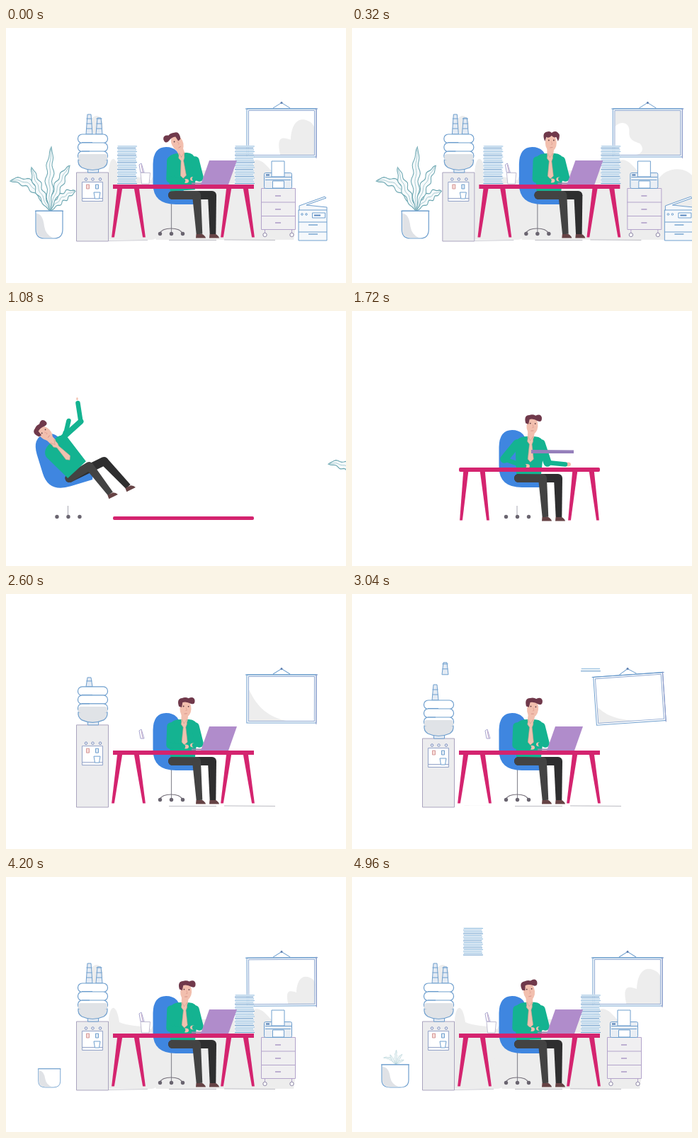
These frames come from a looping animation (480x360 px, 5000 ms). An HTML page with a canvas:

```html
<!DOCTYPE html>
<html>
<head>
<meta charset="utf-8">
<style>
html, body { margin: 0; width: 100%; height: 100%; overflow: hidden; background: #fff }
canvas { display: block }
</style>
</head>
<body>
<canvas id="stage" width="480" height="360"></canvas>
<script>
const c = document.getElementById('stage').getContext('2d');
const BLUE = '#6f9fce', LILAC = '#b3a3cb', GREY = '#ededed', PINK = '#d4246f', GREEN = '#14b391', SKIN = '#f2bfae';
const DONE = 1e5, LOOP = 5000, TAU = Math.PI * 2;

const seg = (t, a, b) => Math.min(1, Math.max(0, (t - a) / (b - a)));
const lerp = (a, b, p) => a + (b - a) * p;
const mix = (p, q, a) => p.map((v, i) => lerp(v, q[i], a));
const smooth = p => p * p * (3 - 2 * p);
const out = p => 1 - (1 - p) ** 3;
function keys(t, ...ks) {
  if (t <= ks[0][0]) return ks[0][1];
  for (let i = 1; i < ks.length; i++)
    if (t <= ks[i][0]) return lerp(ks[i - 1][1], ks[i][1], smooth(seg(t, ks[i - 1][0], ks[i][0])));
  return ks[ks.length - 1][1];
}

function paint(path, fill, stroke, width = 1) {
  if (fill) { c.fillStyle = fill; c.fill(path); }
  if (stroke) { c.strokeStyle = stroke; c.lineWidth = width; c.stroke(path); }
}
const shape = (d, ...style) => paint(new Path2D(d), ...style);
const poly = (pts, ...style) => shape('M' + pts.map(p => p.join(' ')).join('L') + 'Z', ...style);
const line = (pts, stroke, width) => shape('M' + pts.map(p => p.join(' ')).join('L'), null, stroke, width);
function box(x, y, w, h, fill, stroke, r = 0, width = 1) {
  const p = new Path2D();
  p.roundRect(x, y, w, h, r);
  paint(p, fill, stroke, width);
}
function oval(x, y, rx, ry, fill, stroke) {
  const p = new Path2D();
  p.ellipse(x, y, rx, ry, 0, 0, TAU);
  paint(p, fill, stroke);
}
function about(x, y, angle, sx, sy, draw) {
  c.save();
  c.translate(x, y); c.rotate(angle); c.scale(sx, sy); c.translate(-x, -y);
  draw();
  c.restore();
}
function shifted(x, y, draw) {
  c.save(); c.translate(x, y); draw(); c.restore();
}

function backdrop(t, spread) {
  const g = smooth(seg(t, 3000, 4200));
  if (g) {
    about(172, 299, 0, .5 + .5 * g, g, () =>
      shape('M145 299V200C148 176 157 182 160 205C185 215 205 205 212 225C222 260 222 300 205 299Z', GREY));
    about(322, 299, 0, .3 + .7 * g, g, () =>
      shape('M212 299C198 270 196 215 212 205C240 190 330 215 345 190C362 176 372 205 390 215C412 225 412 270 406 299Z', GREY));
  }
  if (spread) about(430, 299, 0, spread, spread, () =>
    shape('M403 299V215C416 193 448 195 456 215V299Z', GREY));
  if (t > 2300) {
    line([[230, 299.5], [297, 299.5]], '#bdbdc4');
    line([[308, 299], [380, 299.5]], '#bdbdc4');
  }
  if (t > 3900) line([[145, 300.5], [200, 299.5]], '#c8c8d0');
}

function boardShade(t, spread) {
  if (t < 3300) about(343, 180, 0, 1, 1 - seg(t, 2800, 3300), () =>
    shape('M343 135C355 160 370 174 400 180H343Z', GREY));
  const g = out(seg(t, 4000, 4500));
  if (g) about(438, 182, 0, g * (1 + spread), g * (1 + 2 * spread), () =>
    shape('M388 182C380 150 392 155 402 158C404 122 424 128 432 135C438 142 438 150 438 182Z', GREY));
  if (spread > .3) {
    c.globalAlpha = seg(spread, .3, 1);
    box(343, 117, 93, 63, GREY);
    c.globalAlpha = 1;
    shape('M343 139C352 130 364 134 363 146C362 158 370 160 378 163C386 172 380 179 368 180H343Z', '#fff');
  }
}

function board(t, spread) {
  const u = t - 2000;
  if (u < 0) return;
  const swing = 40 * Math.exp(-u / 450) * Math.sin(u / 600 * TAU) * Math.PI / 180;
  const size = out(seg(u, 0, 160));
  about(389, 105, swing, size, size, () => {
    box(340, 114, 98, 68, '#fff', BLUE);
    c.save();
    c.beginPath(); c.rect(343, 117, 93, 63); c.clip();
    boardShade(t, spread);
    c.restore();
    box(342.5, 116.5, 93, 63, null, '#8fa9d2');
    line([[338, 114], [440, 114]], '#5f93c8');
    line([[438, 113], [438, 184]], '#8f98c8');
    line([[377, 113], [389, 105.5], [401, 113]], BLUE);
    oval(389, 105.5, 1.5, 1.5, '#5f7fb0');
  });
}

function cup(x, bottom, height) {
  poly([[x - 4.5, bottom], [x - 2.5, bottom - height], [x + 2.5, bottom - height], [x + 4.5, bottom]], '#e4ebf4', BLUE);
  for (let y = 8; y < height; y += 7) line([[x - 4, bottom - y], [x + 4, bottom - y]], BLUE);
}

function bottle() {
  box(115.5, 196, 15, 8, '#e8edf4', BLUE);
  shape('M102 186H143Q144 193 138 197Q122 204 107 197Q101 193 102 186Z', '#e0e3e7', BLUE, 1.2);
  for (const y of [150, 162, 174]) box(101.5, y, 42, 12.5, '#fff', BLUE, 6, 1.2);
  box(102, 178, 41, 9, '#e0e3e7', null, 4);
  line([[107, 161.5], [122, 161.5]], BLUE);
  line([[107, 174], [118, 174]], BLUE);
}

function cooler(t) {
  if (t < 2280) return;
  const h = keys(t, [2280, 0], [2520, 117], [2620, 116], [2800, 95], [2900, 97]);
  const top = 301 - h, size = Math.min(1, h / 97);
  box(99.5, top, 45, h, '#ececee', '#aaa4be');
  c.save();
  c.beginPath(); c.rect(98, top, 48, h); c.clip();
  shifted(0, h < 90 ? top - 204 : (97 - h) * .15, () => {
    for (const x of [113, 122.5, 133]) oval(x, 213.5, 1.7, 1.7, '#fff', '#6d83b8');
    box(107.5, 217.5, 29, 27, '#fff', '#93a3c8');
    line([[107, 240.5], [137, 240.5]], '#93a3c8');
    box(113.5, 221, 4, 6, '#f7dcd8', '#d59a9a');
    box(126.5, 221, 4, 6, '#e1ebf6', BLUE);
    poly([[124, 232], [133, 232], [131.5, 241], [125.5, 241]], '#fff', BLUE);
  });
  c.restore();

  const drop1 = lerp(-60, 0, seg(t, 2440, 2600) ** 2), drop2 = lerp(-72, 0, seg(t, 2900, 3100) ** 2);
  const tall = keys(t, [2640, 13], [3000, 22], [3500, 22], [3800, 28]);
  shifted(0, top - 204, () => {
    if (t > 3900) oval(128, 137, 9, 13, GREY);
    if (t > 2440) cup(117.5, 150 + drop1, tall);
    if (t > 2900) cup(131.5, 150 + drop2, tall - 5);
    about(122, 204, 0, size, size, bottle);
  });
}

function sheet(x, y, i) {
  line([[x, y], [x + 27, y]], '#edf3f9', 2.5);
  line([[x + i % 2, y], [x + 28 - i % 3, y]], i % 4 ? '#94bfe0' : '#6b9dcb', 1);
}

function stacks(t) {
  for (let i = 0; i < 22; i++) {
    const start = 2990 + i * 30;
    if (t > start) sheet(323, lerp(105, 219.5 - i * 2.5, seg(t, start, start + 280) ** 2), i);
  }
  if (t < 4880) return;
  const whole = t >= LOOP, n = whole ? 22 : 16;
  const bottom = whole ? 219.5 : lerp(95, 110, seg(t, 4880, 4960));
  for (let i = 0; i < n; i++) sheet(157, bottom - i * 2.5, i);
}

function leaf(tip, bend) {
  const left = [], right = [], mid = [], base = [62, 258];
  for (let i = 0; i <= 24; i++) {
    const s = i / 24, q = 1 - s;
    const x = q * q * base[0] + 2 * q * s * bend[0] + s * s * tip[0];
    const y = q * q * base[1] + 2 * q * s * bend[1] + s * s * tip[1];
    const dx = 2 * q * (bend[0] - base[0]) + 2 * s * (tip[0] - bend[0]);
    const dy = 2 * q * (bend[1] - base[1]) + 2 * s * (tip[1] - bend[1]);
    const len = Math.hypot(dx, dy), w = 4.8 * Math.sin(Math.PI * s) ** .7, wave = 1.7 * Math.sin(s * 24) * Math.sin(Math.PI * s);
    const at = k => [x - dy / len * k, y + dx / len * k];
    left.push(at(w + wave)); right.unshift(at(-w + wave)); mid.push(at(wave * .6));
  }
  poly([...left, ...right], '#f6fafb', '#69a5b0');
  line(mid, '#9cc4cc', .8);
}

function plant(t) {
  const g = out(seg(t, 4050, 4400));
  if (!g) return;
  const whole = t >= LOOP, grow = whole ? 1 : .27 * out(seg(t, 4600, 4960));
  about(62, 297, 0, g, whole ? 1 : g * .83, () => {
    if (grow) about(62, 258, 0, whole ? 1 : grow * 1.15, grow * 1.2, () => {
      leaf([6, 223], [38, 217]);
      leaf([98, 235], [80, 238]);
      leaf([36, 207], [44, 232]);
      leaf([90, 205], [74, 222]);
      leaf([64, 183], [60, 220]);
    });
    shape('M42 258H80V284Q80 297 68 297H54Q42 297 42 284Z', '#fff', BLUE, 1.2);
    shape('M43 262Q52 262 54 280Q56 292 66 296H54Q43 296 43 284Z', '#e0e2e6');
    line([[41, 258.5], [81, 258.5]], BLUE);
  });
}

function cabinets(t) {
  if (t < 3500) return;
  shifted(lerp(125, 0, out(seg(t, 3500, 3900))), 0, () => {
    box(360.5, 226.5, 48, 58, '#f0eff1', LILAC);
    for (const y of [246, 265.5]) line([[360, y], [409, y]], LILAC);
    for (const y of [237, 256, 275]) line([[380, y], [388, y]], '#9c86bd', 1.2);
    for (const x of [365.5, 403.5]) { line([[x, 285], [x, 290]], LILAC); oval(x, 292, 2.7, 2.7, '#fff', '#8d86a6'); }
    box(364.5, 204.5, 39, 22, '#e9eef4', BLUE, 2);
    box(375, 188, 18, 22, '#fff', BLUE);
    line([[366, 210.5], [403, 210.5]], BLUE);
    line([[367, 207.5], [372, 207.5]], '#4b79b2', 2);
    box(376.5, 216, 16, 10, '#fff', BLUE);
    line([[366, 214.5], [402, 214.5]], BLUE);
  });
  if (t < LOOP) return;
  shape('M414 257L414 251L450 238L452 240L424 250L453 253V300H413V257Z', '#f5f8fb', BLUE);
  for (const y of [257, 274, 288]) line([[413, y], [453, y]], BLUE, 1.2);
  box(432.5, 261, 18, 7, '#fff', BLUE);
  line([[435, 264.5], [444, 264.5]], '#5585be', 2);
  oval(418, 263, 1.3, 1.3, '#fff', BLUE);
  oval(424, 263, 1.3, 1.3, '#fff', BLUE);
  for (const y of [278, 291]) line([[427, y], [440, y]], BLUE, 1.4);
}

function pencils(t) {
  if (t < 2450) return;
  shifted(0, lerp(-60, 0, seg(t, 2450, 2580) ** 2), () => {
    poly([[188, 193], [191, 191], [195, 204], [190, 204]], '#fff', '#a8a5cf');
    line([[191, 193], [193, 204]], '#c3a8ca');
  });
  if (t > 3900) poly([[190, 204.5], [203.5, 204.5], [202, 220], [191.5, 220]], '#fff', '#c0bdd2');
}

function limb(pts, color, width) {
  c.lineCap = c.lineJoin = 'round';
  line(pts, color, width);
  c.lineCap = 'butt'; c.lineJoin = 'miter';
}

function leg(knee, foot, color, lean) {
  limb([[235, 236], knee], color, 12);
  const dx = foot[0] - knee[0], dy = foot[1] - knee[1], len = Math.hypot(dx, dy);
  const side = (p, k) => [p[0] - dy / len * k, p[1] + dx / len * k];
  poly([side(knee, 6), side(foot, 4.3), side(foot, -4.3), side(knee, -6)], color);
  shifted(foot[0], foot[1], () => {
    c.rotate(-.45 * lean);
    shape('M-4.5 0H4Q8 2 9 5.5H-5Z', '#664345');
  });
}

function head(tilt) {
  about(251, 178, tilt * Math.PI / 180, 1, 1, () => {
    poly([[247, 166], [257, 166], [256, 179], [251, 184], [247, 179]], SKIN);
    oval(252.5, 162, 8, 12, SKIN);
    for (const x of [249.5, 256.5]) oval(x, 158.5, .9, .9, '#5a3a40');
    line([[253, 160], [254.5, 164], [252.5, 164.5]], '#e0a093', .8);
    line([[251, 169], [255, 168.5]], '#cf8880', .8);
    if (Math.abs(tilt) < 1) {
      shape('M244 160Q239 148 247 146.5Q251 145 253.5 148Q258 144.5 262 147.5Q267 151 262.5 160L260 154Q256 155.5 253.5 152Q250 156 246 154Z', '#70394b');
      return;
    }
    about(251, 150, 0, tilt < -12 ? -1 : 1, 1, () =>
      shape('M243 159Q239 148 247 147Q252 145 256 147Q263 143 265 149Q266 156 260 154.5Q253 151 248 153L247 160Z', '#70394b'));
  });
}

function chair(lean, settled) {
  if (settled) {
    line([[233.5, 248], [233.5, 289]], '#8c8c94', 1.2);
    shape('M217 290Q220 283 233 283T249 290', null, '#77727c', 1.2);
  } else line([[233, 275], [233, 289]], '#a9a9b4');
  for (const x of [217.5, 233.5, 249.5]) oval(x, 290.5, 2.7, 2.7, '#6a6570');
  about(233, 258, -.3 * lean, 1, 1, () =>
    shape('M207.5 192Q208 168 226 168Q245 168 247 190L251 232H268Q278 236 272 249H240Q207.5 249 207.5 220Z', '#3f86e0'));
}

function worker(t, clock, lean, reach, tilt) {
  const tap = Math.sin(clock / 90) * (1 - lean);
  chair(lean, t > 1800);
  leg(mix([291, 236], [284, 212], lean), mix([292, 291], [318, 248], lean), '#2e2e2f', lean);
  leg(mix([269, 236], [263, 219], lean), mix([273, 291], [293, 258], lean), '#434343', lean);

  about(240, 232, -.74 * lean + tilt * .003, 1, 1, () => {
    shape('M230 188Q232 177 247 177H258Q268 177 271 188L267 230H232Z', GREEN);
    head(tilt);
    shape('M248 177L251 183L255 177L255 184L253.5 188L256 209L251.5 213L248 209L250 188L247 184Z', '#f0c2b0', '#c9a28f', .6);
  });

  const left = [[233, 187], mix([232, 213], [215, 209], reach), mix([250, 216 + tap], [243, 219], reach)];
  const right = [[267, 187], mix([273, 211], [276, 214], reach), mix([266, 213 - tap], [301, 216.5], reach)];
  const raisedLeft = [[226, 185], [230, 172], [234, 155]], raisedRight = [[221, 183], [251, 156], [247, 130]];
  const blend = (a, b) => a.map((p, i) => mix(p, b[i], lean));
  for (const arm of [blend(left, raisedLeft), blend(right, raisedRight)]) {
    const [x, y] = arm[2];
    if (lean < .8) oval(x + (x > arm[1][0] ? 4 : -2), y, 4, 3, SKIN);
    limb(arm.slice(0, 2), GREEN, lerp(11.5, 8, lean));
    limb(arm.slice(1), GREEN, 6.5);
  }
  if (lean > .8) oval(246, 124, 1.2, 2, SKIN);
}

function desk(t) {
  if (t < 800) return;
  const half = 99.5 * out(seg(t, 800, 1000));
  const y = keys(t, [1120, 292.5], [1480, 220], [1580, 224]);
  const splay = smooth(seg(t, 1720, 1960)), thick = y > 285 ? 5 : 6;
  if (y < 288) for (const [top, foot, wide] of [[161, 154, 151], [184, 192, 195], [315, 307, 305], [338, 347, 349]])
    poly([[top - 3.6, y], [top + 3.6, y], [lerp(foot, wide, splay) + 1.9, 295.5], [lerp(foot, wide, splay) - 1.9, 295.5]], PINK);
  box(250.5 - half, y - thick / 2, half * 2, thick, PINK, null, 2 - 2 * splay);
}

function laptop(t) {
  if (t < 1560) return;
  const y = keys(t, [1560, 160], [1720, 198.5], [1820, 219]);
  const open = smooth(seg(t, 1860, 2160));
  if (open) line([[262, 219.5], [312, 219.5]], '#9b86ad', 2);
  const slab = [[253, y - 2.5], [313, y - 2], [313, y + 2.5], [253, y + 2.5]];
  const lid = [[287, 187], [326, 187], [314, 221], [275, 221]];
  poly(slab.map((p, i) => mix(p, lid[i], open)), open > .3 ? '#b08ccb' : '#957fbb');
}

function scene(t, clock, tilt, spread = 0) {
  const lean = 1 - smooth(seg(t, 1120, 1620));
  const reach = 1 - smooth(seg(t, 1760, 2100));
  const roll = -146 * (Math.max(0, 1700 - t) / 620) ** 2;
  backdrop(t, spread);
  board(t, spread);
  stacks(t);
  cooler(t);
  plant(t);
  cabinets(t);
  pencils(t);
  shifted(roll, 0, () => worker(t, clock, lean, reach, tilt));
  desk(t);
  laptop(t);
}

function render(t) {
  c.fillStyle = '#fff';
  c.fillRect(0, 0, 480, 360);
  const tilt = keys(t, [0, -22], [280, 0], [700, 0], [1080, -3], [1720, 4], [2600, 2], [3200, 6], [3480, 18], [3800, 16], [4300, 2], [4960, -5]);
  if (t < 1160) shifted(4.36e-4 * Math.max(0, t - 66) ** 2, 0, () => scene(DONE, t, t < 700 ? tilt : 0, seg(t, 0, 320)));
  if (t > 700) scene(t, t, tilt);
}

function frame() {
  render(performance.now() % LOOP);
  requestAnimationFrame(frame);
}
frame();
</script>
</body>
</html>
```
